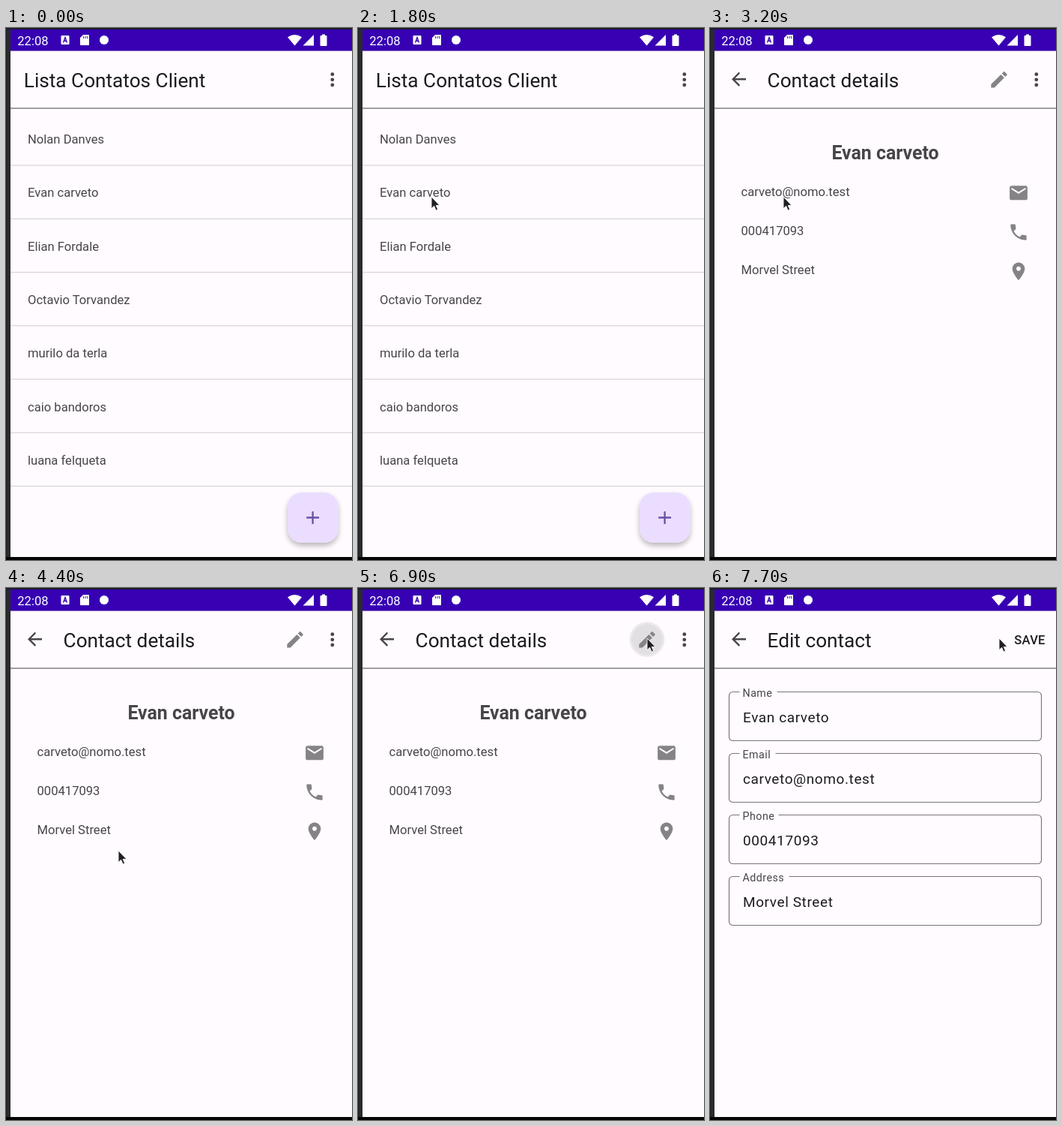
Recreate the animation shown at these times as an HTML page. Size 462x709 px, loop 8000 ms.

```html
<!DOCTYPE html>
<html lang="pt">
<head>
<meta charset="utf-8">
<title>Contacts app</title>
<style>
  html, body { margin: 0; width: 100%; height: 100%; overflow: hidden; background: #000; }
  svg { display: block; font: 16.6px Roboto, sans-serif; fill: #48454a; }
  .title { font-size: 26.2px; fill: #1c1b1f; }
  .name { font-size: 24.9px; font-weight: 700; text-anchor: middle; }
  .label { font-size: 14.25px; letter-spacing: .47px; }
  .value { font-size: 19px; letter-spacing: .6px; fill: #1c1b1f; }
  .save { font-weight: 500; letter-spacing: .2px; fill: #1c1b1f; }
  .gray { fill: #858386; }
</style>
</head>
<body>
<svg width="462" height="709" viewBox="0 0 462 709">
  <defs>
    <radialGradient id="rippleFill">
      <stop offset=".8" stop-color="#e2dfe2"/>
      <stop offset="1" stop-color="#f1eef1"/>
    </radialGradient>
    <filter id="shadow" x="-30%" y="-30%" width="160%" height="170%">
      <feDropShadow dx="0" dy="4" stdDeviation="3.5" flood-color="#000" flood-opacity=".28"/>
    </filter>
  </defs>

  <!-- window edge, page and status bar -->
  <rect width="462" height="709" fill="#050505"/>
  <rect width="6" height="705" fill="#2a2b2d"/>
  <rect width="1" height="705" fill="#1b1c1d"/>
  <rect width="462" height="2" fill="#1d1a26"/>
  <rect x="6" y="2" width="456" height="703" fill="#fffbfe"/>
  <rect x="6" y="2" width="456" height="28.5" fill="#3700b3"/>
  <g fill="#fff">
    <text x="15.3" y="22.7">22:08</text>
    <rect x="73.5" y="10" width="11" height="12" rx="1"/>
    <path d="M103 9H110Q111 9 111 10V22Q111 23 110 23H100Q99 23 99 22V13Z"/>
    <circle cx="131" cy="16" r="6"/>
    <path d="M385.5 23.5 376 12.3Q385.5 5.5 395 12.3Z"/>
    <path d="M396.5 23.5 411 9V23.5Z"/>
    <path d="M422 8.5H426V10H427.5Q428.5 10 428.5 11V23Q428.5 24 427.5 24H420.5Q419.5 24 419.5 23V11Q419.5 10 420.5 10H422Z"/>
  </g>
  <path d="M76.5 19.5 79 12.5 81.5 19.5M77.5 17.3H80.5" fill="none" stroke="#3700b3" stroke-width="1.4"/>
  <path d="M103.5 11V14M106 11V14M108.5 11V14" stroke="#3700b3" stroke-width=".9"/>
  <rect x="6" y="106.3" width="456" height="1.4" fill="#7b767c"/>

  <g id="list">
    <text class="title" x="23.8" y="79">Lista Contatos Client</text>
    <g id="rows"></g>
    <rect x="376" y="619" width="67.5" height="67" rx="19" fill="#eaddff" filter="url(#shadow)"/>
    <path d="M401.3 652.5H418M409.6 644.2V661" stroke="#6750a4" stroke-width="2.3"/>
  </g>

  <g id="back"></g>

  <g id="details">
    <text class="title" x="76.6" y="79">Contact details</text>
    <circle id="ripple" cx="386" cy="68.5" r="23.5" fill="url(#rippleFill)"/>
    <g id="pencil"></g>
    <g id="card"></g>
  </g>

  <g id="edit">
    <text class="title" x="76.6" y="79">Edit contact</text>
    <text class="save" x="406.3" y="75">SAVE</text>
    <g id="form"></g>
  </g>

  <g id="more">
    <circle cx="435.8" cy="61.7" r="2.4"/>
    <circle cx="435.8" cy="68.8" r="2.4"/>
    <circle cx="435.8" cy="75.9" r="2.4"/>
  </g>

  <g id="progress">
    <rect x="6" y="107.7" width="456" height="4.6" fill="#e6dfeb"/>
    <rect id="bar" y="107.7" height="4.6" fill="#6750a4"/>
  </g>

  <path id="cursor" d="M0 0V15.6L3.6 12.3 6 18 8.6 16.9 6.2 11.4H11Z" fill="#202022" stroke="#fff" stroke-width=".9"/>
</svg>
<script>
const LOOP = 8000, STEP = 100;
const $ = id => document.getElementById(id);
const contacts = ["Nolan Danves", "Evan carveto", "Elian Fordale", "Octavio Torvandez",
  "murilo da terla", "caio bandoros", "luana felqueta"];
const person = { name: contacts[1], email: "carveto@nomo.test", phone: "000417093", address: "Morvel Street" };

const icons = {
  back: "M20 11H7.83l5.59-5.59L12 4l-8 8 8 8 1.41-1.41L7.83 13H20v-2z",
  pencil: "M3 17.25V21h3.75L17.81 9.94l-3.75-3.75L3 17.25zM20.71 7.04c.39-.39.39-1.02 0-1.41l-2.34-2.34c-.39-.39-1.02-.39-1.41 0l-1.83 1.83 3.75 3.75 1.83-1.83z",
  mail: "M20 4H4c-1.1 0-2 .9-2 2v12c0 1.1.9 2 2 2h16c1.1 0 2-.9 2-2V6c0-1.1-.9-2-2-2zm0 4l-8 5-8-5V6l8 5 8-5v2z",
  phone: "M6.62 10.79c1.44 2.83 3.76 5.14 6.59 6.59l2.2-2.2c.27-.27.67-.36 1.02-.24 1.12.37 2.33.57 3.57.57.55 0 1 .45 1 1V20c0 .55-.45 1-1 1-9.39 0-17-7.61-17-17 0-.55.45-1 1-1h3.5c.55 0 1 .45 1 1 0 1.25.2 2.45.57 3.57.11.35.03.74-.25 1.02l-2.2 2.2z",
  pin: "M12 2C8.13 2 5 5.13 5 9c0 5.25 7 13 7 13s7-7.75 7-13c0-3.87-3.13-7-7-7zm0 9.5c-1.38 0-2.5-1.12-2.5-2.5s1.12-2.5 2.5-2.5 2.5 1.12 2.5 2.5-1.12 2.5-2.5 2.5z"
};
const icon = (name, x, y, cls = "gray") =>
  `<path class="${cls}" d="${icons[name]}" transform="translate(${x} ${y}) scale(1.1875) translate(-12 -12)"/>`;
const text = (x, y, content, cls = "") => `<text class="${cls}" x="${x}" y="${y}">${content}</text>`;

$("back").innerHTML = icon("back", 38.5, 68.2, "");
$("pencil").innerHTML = icon("pencil", 386, 68.8);
$("rows").innerHTML = contacts.map((name, i) =>
  text(29, 154 + 71.3 * i, name) +
  `<rect x="6" y="${182.5 + 71.25 * i}" width="456" height="1.1" fill="#d6d1d7"/>`).join("");
$("card").innerHTML = text(234, 175, person.name, "name") +
  [[person.email, "mail"], [person.phone, "phone"], [person.address, "pin"]].map(([value, name], i) =>
    text(41.5, 224 + 52.2 * i, value) + icon(name, 412, 219.8 + 52.3 * i)).join("");
$("form").innerHTML = [["Name", person.name, 50], ["Email", person.email, 48],
  ["Phone", person.phone, 52], ["Address", person.address, 66]].map(([label, value, notch], i) =>
    `<g transform="translate(0 ${82 * i})">
      <rect x="25.5" y="138.5" width="417" height="65" rx="5" fill="none" stroke="#79747e" stroke-width="1.15"/>
      <rect x="39.5" y="136" width="${notch}" height="5" fill="#fffbfe"/>
      ${text(43.5, 144.8, label, "label")}${text(44, 178.6, value, "value")}</g>`).join("");

// pointer path: time, x, y
const path = [
  [400, 45, 2], [600, 62, 62], [800, 100, 136], [1000, 150, 196], [1200, 195, 222], [1300, 216, 226],
  [1500, 172, 225], [1800, 98, 225],
  [4000, 98, 225], [4200, 90, 268], [4400, 150, 350], [4600, 272, 315], [4750, 240, 191], [4900, 144, 209],
  [5000, 215, 207], [5100, 302, 190], [5200, 359, 161], [5400, 383, 106], [5700, 386, 67]
];
function pointerAt(t) {
  const next = path.findIndex(p => p[0] > t);
  if (next < 0) return path[path.length - 1].slice(1);
  const [t0, x0, y0] = path[next - 1], [t1, x1, y1] = path[next];
  const k = (t - t0) / (t1 - t0);
  return [x0 + (x1 - x0) * k, y0 + (y1 - y0) * k];
}

const show = (id, on) => $(id).style.display = on ? "" : "none";
const ease = k => { k = Math.min(1, Math.max(0, k)); return k * k * (3 - 2 * k); };

function draw(t) {
  const screen = t < 2700 ? "list" : t < 7100 ? "details" : "edit";
  for (const id of ["list", "details", "edit"]) show(id, id === screen);
  show("back", screen !== "list");
  show("more", screen !== "edit");
  show("card", t >= 3200);
  show("form", t >= 7700);
  show("ripple", t >= 6900);

  const loading = screen === "details" ? t < 3200 : screen === "edit" && t < 7700;
  show("progress", loading);
  if (loading) {
    const elapsed = t - (screen === "details" ? 2800 : 7100);
    const head = ease(elapsed / 750), tail = ease((elapsed - 333) / 850);
    $("bar").setAttribute("x", 6 + 456 * tail);
    $("bar").setAttribute("width", 456 * (head - tail));
  }

  show("cursor", t >= 400);
  if (t >= 400) $("cursor").setAttribute("transform", `translate(${pointerAt(t)})`);
}

const start = performance.now();
function tick() {
  const t = (performance.now() - start) % LOOP;
  draw(Math.floor(t / STEP) * STEP);
  requestAnimationFrame(tick);
}
tick();
</script>
</body>
</html>
```
